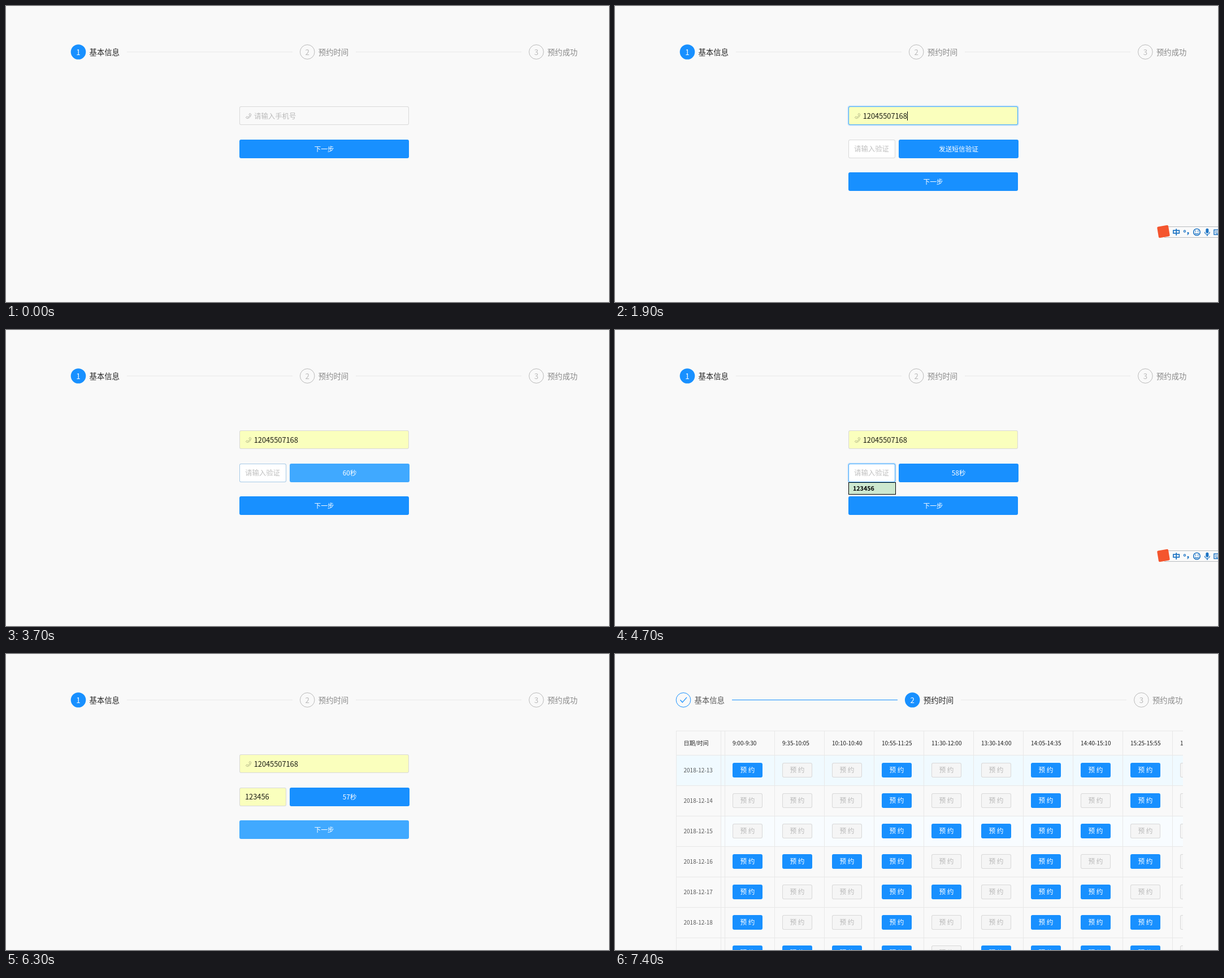
These frames come from a looping animation (1067x525 px, 8000 ms). An HTML page with a canvas:

```html
<!DOCTYPE html>
<html lang="zh-CN">
<head>
<meta charset="utf-8">
<title>预约</title>
<style>
html, body { margin: 0; width: 100%; height: 100%; overflow: hidden; background: #f9f9f9; }
canvas { display: block; }
</style>
</head>
<body>
<canvas id="stage" width="1067" height="525"></canvas>
<script>
const ctx = document.getElementById('stage').getContext('2d');
const LOOP = 8000;
const FONT = '"Noto Sans CJK SC", "Noto Sans CJK", "Noto Sans", sans-serif';
const PHONE = '12045507168', CODE = '123456';

const PAGE = [249, 249, 249], WHITE = [255, 255, 255], YELLOW = [250, 255, 189];
const BLUE = [24, 144, 255], LIGHT = [64, 169, 255], GREY = [217, 217, 217];
const MENU = [205, 232, 207], MENU_HOVER = [166, 212, 219];
const FAINT = 'rgba(0,0,0,.25)', RULE = '#e8e8e8', IME_BLUE = '#1b73c4';

const rgb = c => `rgb(${c.map(Math.round).join(',')})`;
const mix = (a, b, k) => a.map((v, i) => v + (b[i] - v) * k);
const within = (t, ...spans) => spans.some(([a, b]) => t >= a && t < b);

// Stepped fade: n steps of 100 ms, the first already visible at start.
const fade = (t, start, n = 3) =>
  Math.max(0, Math.min(1, (Math.floor((t - start) / 100) + 1) / n));

function text(s, x, cy, size, color, align = 'left', weight = 400) {
  ctx.font = `${weight} ${size}px ${FONT}`;
  ctx.textAlign = align;
  ctx.fillStyle = color;
  ctx.fillText(s, x, cy + size * 0.37);
}

function rect(x, y, w, h, color) {
  ctx.fillStyle = color;
  ctx.fillRect(x, y, w, h);
}

function box(x, y, w, h, fill, border, r = 3) {
  ctx.beginPath();
  ctx.roundRect(x, y, w, h, r);
  ctx.fillStyle = border || fill;
  ctx.fill();
  if (!border) return;
  ctx.beginPath();
  ctx.roundRect(x + 1, y + 1, w - 2, h - 2, r - 1);
  ctx.fillStyle = fill;
  ctx.fill();
}

function line(points, color, width) {
  ctx.beginPath();
  points.forEach(([x, y]) => ctx.lineTo(x, y));
  ctx.strokeStyle = color;
  ctx.lineWidth = width;
  ctx.stroke();
}

function circle(x, y, r, color, width) {
  ctx.beginPath();
  ctx.arc(x, y, r, 0, Math.PI * 2);
  if (width) {
    ctx.strokeStyle = color;
    ctx.lineWidth = width;
    ctx.stroke();
  } else {
    ctx.fillStyle = color;
    ctx.fill();
  }
}

function steps(left, active) {
  ['基本信息', '预约时间', '预约成功'].forEach((title, i) => {
    const x = left + 13.3 + i * 405.2, y = 81.5;
    const done = i < active, now = i === active;
    if (now) circle(x, y, 13.3, rgb(BLUE));
    else circle(x, y, 12.8, done ? rgb(BLUE) : FAINT, 1);
    if (done) line([[x - 5.5, y], [x - 1.7, y + 4.3], [x + 6, y - 4.7]], rgb(BLUE), 1.3);
    else text(i + 1, x, 82, 13.3, now ? '#fff' : FAINT, 'center');
    text(title, x + 19.6, 81.8, 13.33, `rgba(0,0,0,${now ? 0.85 : done ? 0.65 : 0.45})`);
    if (i < 2) rect(Math.round(x + 86), 81, 293, 1, done ? rgb(BLUE) : RULE);
  });
}

function input(x, y, w, fill, blue, glow) {
  if (glow > 0) box(x - 1.7, y - 1.7, w + 3.4, 36.4, `rgba(24,144,255,${0.2 * glow})`, null, 4.5);
  box(x, y, w, 33, rgb(fill), rgb(mix(GREY, LIGHT, blue)));
}

function button(x, y, w, label, light) {
  box(x, y, w, 33, rgb(mix(BLUE, LIGHT, light)));
  text(label, x + w / 2, y + 16.5, 11.67, '#fff', 'center');
}

function menu(x, y, w, label, hover) {
  rect(x, y, w, 22, '#000');
  rect(x + 1, y + 1, w - 2, 20, rgb(hover ? MENU_HOVER : MENU));
  text(label, x + 8, y + 11, 10.7, '#000', 'left', 700);
}

const caret = (x, y) => rect(x, y, 1, 16, '#000');

function phoneIcon() {
  ctx.save();
  ctx.translate(422.5, 188.4);
  ctx.scale(0.013, 0.013);
  ctx.beginPath();
  ctx.moveTo(722, 147);
  ctx.lineTo(845, 270);
  ctx.bezierCurveTo(850, 600, 600, 850, 270, 845);
  ctx.lineTo(147, 722);
  ctx.lineTo(296, 570);
  ctx.lineTo(430, 690);
  ctx.quadraticCurveTo(610, 620, 690, 430);
  ctx.lineTo(570, 296);
  ctx.closePath();
  ctx.lineJoin = 'round';
  ctx.strokeStyle = 'rgba(0,0,0,.3)';
  ctx.lineWidth = 72;
  ctx.stroke();
  ctx.restore();
}

function imeBar() {
  rect(972, 391, 95, 20, '#b9bcbf');
  rect(972, 392, 95, 18, '#fafafa');
  ctx.save();
  ctx.translate(970.5, 400);
  ctx.rotate(-0.16);
  box(-10, -10, 20, 20, '#f4552e', null, 2);
  ctx.restore();

  // 中
  ctx.strokeStyle = IME_BLUE;
  ctx.lineWidth = 1.7;
  ctx.strokeRect(988, 398, 10.4, 5);
  line([[993.2, 395], [993.2, 407]], IME_BLUE, 1.8);
  // punctuation
  circle(1008, 399.5, 1.6, IME_BLUE, 1.2);
  circle(1014, 402.5, 1.5, IME_BLUE);
  line([[1015, 402.5], [1014.3, 404.6], [1012.6, 406]], IME_BLUE, 1.2);
  // smile
  circle(1029.5, 401, 5.8, IME_BLUE, 1.6);
  circle(1027.3, 399.3, 1, IME_BLUE);
  circle(1031.7, 399.3, 1, IME_BLUE);
  ctx.beginPath();
  ctx.arc(1029.5, 401.3, 3, 0.3, Math.PI - 0.3);
  ctx.lineWidth = 1.3;
  ctx.stroke();
  // microphone
  box(1045.4, 394.5, 5, 8.5, IME_BLUE, null, 2.5);
  ctx.beginPath();
  ctx.arc(1047.9, 400.8, 4.4, 0, Math.PI);
  ctx.stroke();
  line([[1047.9, 405], [1047.9, 408]], IME_BLUE, 1.6);
  // keyboard
  ctx.lineWidth = 1.5;
  ctx.strokeRect(1060, 397, 13, 8.5);
  for (let i = 0; i < 6; i++) rect(1062 + (i % 3) * 2.4, 399 + (i > 2 ? 2.4 : 0), 1.4, 1.4, IME_BLUE);
  rect(1063, 403.4, 6, 1, IME_BLUE);
}

function form(t) {
  steps(114.7, 0);
  const open = t >= 1100;

  const phoneBlur = fade(t, 2800);
  input(413, 178, 300, mix(PAGE, YELLOW, fade(t, 1600)),
    fade(t, 700) - phoneBlur, fade(t, 1200, 2) - phoneBlur);
  phoneIcon();
  if (t < 1600) text('请输入手机号', 439, 195, 12.4, FAINT);
  else text(PHONE, 438.7, 195, 12.8, 'rgba(0,0,0,.9)');
  if (within(t, [1100, 1600])) caret(439, 187);
  if (within(t, [1900, 2200], [2600, 2800])) caret(517, 187);

  if (!open) {
    button(413, 237, 300, '下一步', 0);
    return;
  }

  const codeBlur = fade(t, 6200, 2);
  const codeBlue = fade(t, 2200, 2) - fade(t, 2600) + fade(t, 3700) - codeBlur;
  input(413, 237, 83, mix(WHITE, YELLOW, fade(t, 5200)), codeBlue, fade(t, 4200) - codeBlur);
  if (t < 5200) text('请输入验证', 423, 253.5, 12.4, FAINT);
  else text(CODE, 423, 253.5, 12.8, 'rgba(0,0,0,.9)');
  if (within(t, [4200, 4700], [4900, 5200])) caret(423, 245);
  if (within(t, [5700, 6200])) caret(466, 245);

  const left = 60 - [3800, 4700, 5700, 6700].filter(s => t >= s && s < 6000).length;
  button(502, 237, 212, t < 2800 ? '发送短信验证' : left + '秒', fade(t, 2600) - fade(t, 4200));
  button(413, 295, 300, '下一步', t >= 6000 ? 1 : 0);

  if (t < 1900) menu(413, 211, 301, PHONE, t >= 1600);
  if (within(t, [4200, 5700])) menu(413, 270, 84, CODE, t >= 5200);
  if (within(t, [1100, 2800], [4200, 6200])) imeBar();
}

const HOURS = ['9:00-9:30', '9:35-10:05', '10:10-10:40', '10:55-11:25', '11:30-12:00',
  '13:30-14:00', '14:05-14:35', '14:40-15:10', '15:25-15:55', '16:00-16:30'];
const FREE = ['1001001110', '0001001010', '0001111100', '1111001010',
  '1001101100', '1001001110', '1111011110'];

function slot(x, y, free) {
  if (free) box(x, y, 53, 26, rgb(BLUE));
  else box(x, y, 53, 26, '#f5f5f5', rgb(GREY));
  text('预 约', x + 26.5, y + 13, 11.67, free ? '#fff' : FAINT, 'center');
}

function table(t) {
  steps(107.7, 1);
  ctx.save();
  ctx.beginPath();
  ctx.rect(108, 136, 897, 389);
  ctx.clip();

  const later = t >= 7400;
  if (later) rect(108, 180, 897, 53, '#f0faff');
  rect(188, 288, 817, 53, later ? '#f8fcff' : t >= 7000 ? '#e8f7ff' : '#ebf8fe');

  rect(108, 136, 897, 1, RULE);
  FREE.forEach((_, r) => rect(108, 179 + r * 54, 897, 1, RULE));
  rect(108, 136, 1, 389, RULE);
  rect(187, 136, 1, 389, RULE);

  text('日期/时间', 121.5, 158, 10, 'rgba(0,0,0,.85)');
  HOURS.forEach((h, c) => {
    rect(194 + c * 88, 136, 1, 389, RULE);
    text(h, 208 + c * 88, 158, 10, 'rgba(0,0,0,.9)');
  });
  FREE.forEach((row, r) => {
    const y = 193 + r * 54;
    text('2018-12-' + (13 + r), 121.5, y + 13.5, 10, 'rgba(0,0,0,.65)');
    [...row].forEach((f, c) => slot(208 + c * 88, y, f === '1'));
  });
  ctx.restore();
}

function draw(now) {
  const t = now % LOOP;
  rect(0, 0, 1067, 525, rgb(PAGE));
  (t < 6900 ? form : table)(t);
}

const start = performance.now();
function tick() {
  draw(performance.now() - start);
  requestAnimationFrame(tick);
}
tick();
</script>
</body>
</html>
```
